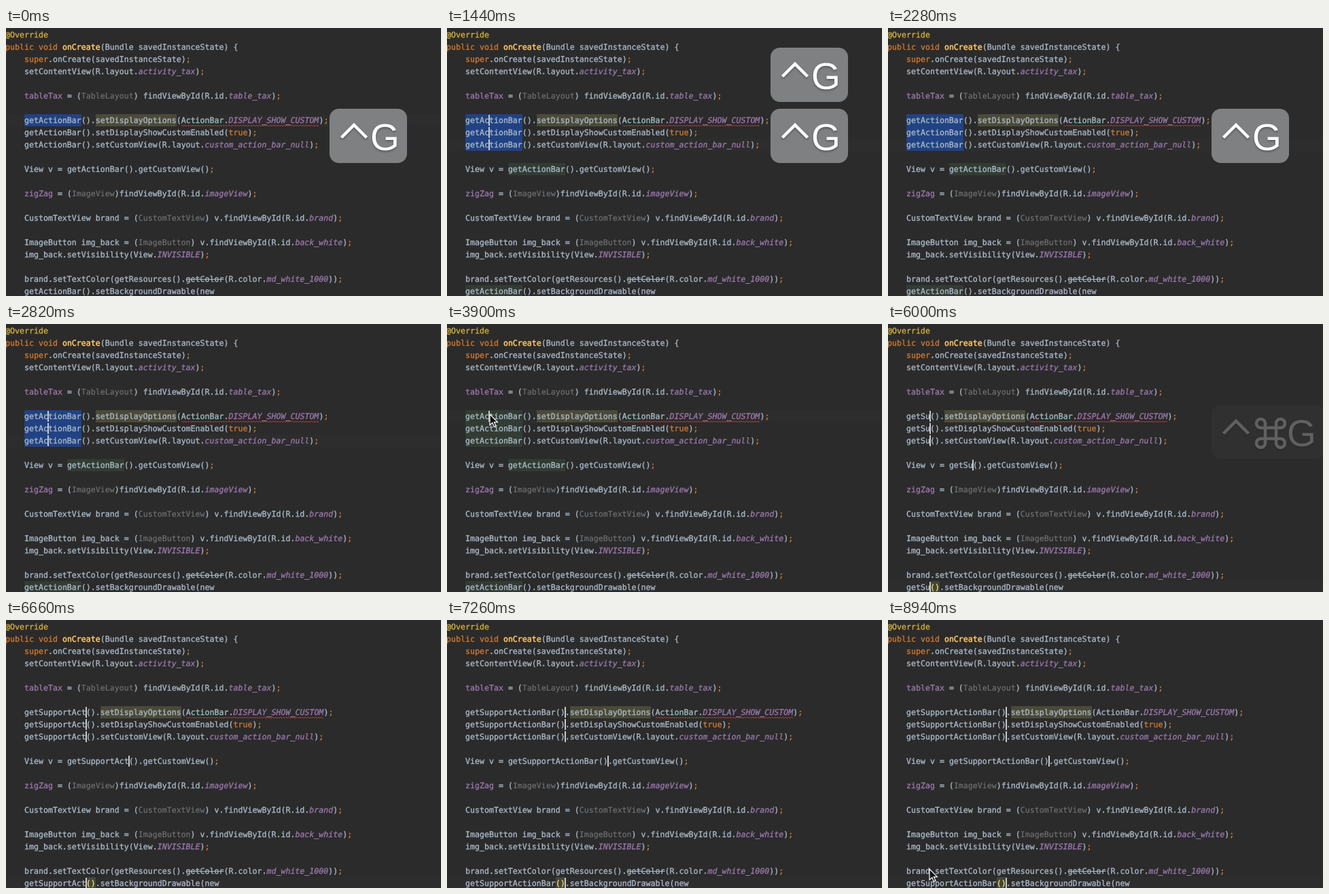
An HTML page that plays this animation: 640 by 395 pixels, repeating every 9 s.

```html
<!DOCTYPE html>
<html lang="en">
<head>
<meta charset="utf-8">
<title>Multiple carets</title>
<style>
html, body { margin: 0; width: 100%; height: 100%; overflow: hidden; background: #2b2b2b; }
#stage { position: relative; width: 640px; height: 395px; overflow: hidden; background: #2b2b2b; }
.line {
  position: absolute; left: -1px; height: 18px; white-space: pre; color: #a9b7c6;
  font: 11.627px/18px "DejaVu Sans Mono", monospace;
  text-rendering: geometricPrecision; font-variant-ligatures: none;
  -webkit-text-stroke: .35px;
}
#row { position: absolute; left: 0; width: 640px; height: 18px; background: #2d2d2d; }
.line b, .w, .m { display: inline-block; position: relative; height: 18px; vertical-align: top; font-weight: 400; }
b.use { background: #323c33; }
b.sel { background: #214283; }
.caret { position: absolute; top: 1px; width: 2px; height: 16px; margin-left: -1px; background: #c8c8c8; z-index: 1; }
.a { color: #cfae3c; }
.o { color: #cc7832; }
.y { color: #ffc66d; -webkit-text-stroke-width: .5px; }
.p, .f { color: #9876aa; }
.f { font-style: italic; }
.g { color: #747678; -webkit-text-stroke-width: .1px; }
.s { text-decoration: line-through; }
.w { background: #4b4a38; }
.match .m { background: #43463c; color: #ffd75e; }
.e { position: relative; }
.bad .e::after {
  content: ""; position: absolute; left: 0; right: 0; bottom: -2px; height: 2px;
  background:
    linear-gradient(90deg, #a8403c 50%, transparent 0) 0 0 / 4px 1px repeat-x,
    linear-gradient(90deg, #a8403c 50%, transparent 0) 2px 1px / 4px 1px repeat-x;
}
svg { position: absolute; left: 0; top: 0; }
.bezel rect { fill: #7e8082; }
.bezel path { fill: none; stroke: #fff; stroke-width: 4.5; }
.bezel text { fill: #fff; font: 55px "Liberation Sans", Arial, sans-serif; }
.bezel g { filter: drop-shadow(0 2px 1.5px rgba(0, 0, 0, .3)); }
</style>
</head>
<body>
<div id="stage">
  <div id="row"></div>
  <svg id="overlay" width="640" height="395">
    <g id="pointer">
      <path d="M0 0V16L3.8 12.6L6.4 18.4L9 17.2L6.4 11.6H11.4Z" fill="#111" stroke="#fff" stroke-width="1.2"/>
    </g>
  </svg>
</div>
<script>
// ~x{text} styles text with class x (one class per letter); $ is the edited name.
const CODE = `~a{@Override}
~o{public void} ~y{onCreate}(Bundle savedInstanceState) {
    ~o{super}.onCreate(savedInstanceState);
    setContentView(R.layout.~f{activity_tax});

    ~p{tableTax} = (~g{TableLayout}) findViewById(R.id.~f{table_tax});

    $~m{()}.~w{setDisplayOptions}(~e{ActionBar.}~ef{DISPLAY_SHOW_CUSTOM});
    $~m{()}.setDisplayShowCustomEnabled(~o{true});
    $~m{()}.setCustomView(R.layout.~f{custom_action_bar_null});

    View v = $~m{()}.getCustomView();

    ~p{zigZag} = (~g{ImageView})findViewById(R.id.~f{imageView});

    CustomTextView brand = (~g{CustomTextView}) v.findViewById(R.id.~f{brand});

    ImageButton img_back = (~g{ImageButton}) v.findViewById(R.id.~f{back_white});
    img_back.setVisibility(View.~f{INVISIBLE});

    brand.setTextColor(getResources().~s{getColor}(R.color.~f{md_white_1000}));
    $~m{()}.setBackgroundDrawable(new`;

const LOOP = 9000, STEP = 60;
const USAGES = 300, CLICK = 3400, SELECT_ALL = 4600, TYPE = 5680, KEY = 80, TYPED = 7200, FIXED = 8100;
const PRESSES = [-60, 540, 1080, SELECT_ALL];
const LINGER = 1250, FADE = 200;
const OLD_NAME = "getActionBar", NEW_NAME = "getSupportActionBar";

const $ = id => document.getElementById(id);
const stage = $("stage"), overlay = $("overlay"), pointer = $("pointer"), row = $("row");
const lineTop = i => 18 * i + 1;
const clamp = (v, lo, hi) => Math.max(lo, Math.min(hi, v));

const names = [];
CODE.split("\n").forEach((code, i) => {
  const line = document.createElement("div");
  line.className = "line";
  line.style.top = lineTop(i) + "px";
  line.innerHTML = code
    .replace(/;/g, "~o{;}")
    .replace(/~([a-z]+)\{(.*?)\}/g, (_, c, text) => `<span class="${[...c].join(" ")}">${text}</span>`)
    .replace("$", () => '<b><span class="name"></span><span class="caret"></span></b>');
  stage.insertBefore(line, overlay);
  const box = line.querySelector("b");
  if (box) names.push({ i, line, box, text: box.firstChild, caret: box.lastChild });
});
const first = names[0], last = names[names.length - 1];

const CTRL = '<path d="M17.5 42.5L36 24L54.5 42.5"/>';
const CMD = '<path transform="translate(87 42)" d="M-8-14.5A6.5 6.5 0 1 0-14.5-8H14.5A6.5 6.5 0 1 0 8-14.5V14.5' +
  'A6.5 6.5 0 1 0 14.5 8H-14.5A6.5 6.5 0 1 0-8 14.5Z"/>';
const bezels = PRESSES.map(at => {
  const all = at === SELECT_ALL;
  const el = document.createElementNS("http://www.w3.org/2000/svg", "g");
  el.setAttribute("class", "bezel");
  el.innerHTML = `<rect width="${all ? 166 : 114}" height="80" rx="14"/>
    <g>${CTRL}${all ? CMD : ""}<text x="${all ? 111 : 60}" y="61">G</text></g>`;
  overlay.insertBefore(el, pointer);
  return el;
});

// The panel fades faster than its glyphs: its opacity applies on top of the group's.
function drawBezels(t) {
  bezels.forEach((el, k) => {
    const age = t - PRESSES[k];
    const newer = PRESSES.filter((at, j) => j > k && at <= t).length;
    const opacity = age < 0 ? 0 : clamp(1 - (age - LINGER) / FADE, 0, 1);
    el.setAttribute("transform", `translate(476 ${119 - 90 * newer})`);
    el.setAttribute("opacity", opacity);
    el.firstChild.setAttribute("opacity", opacity);
  });
}

function drawPointer(t) {
  const resting = t >= 3300 && t < SELECT_ALL, moving = t >= 8460;
  const k = clamp((t - 8460) / 420, 0, 1), ease = k * k * (3 - 2 * k);
  pointer.style.display = resting || moving ? "" : "none";
  pointer.setAttribute("transform", `translate(${63 - 2 * ease} ${133 + 234 * ease})`);
}

function drawEditor(t) {
  const typing = t >= TYPE, allCarets = t >= SELECT_ALL;
  const picked = allCarets ? names.length : t >= CLICK ? 1 : PRESSES.filter(at => at <= t).length;
  const selecting = !typing && (allCarets || t < CLICK);
  const count = clamp(Math.floor((t - TYPE) / KEY) + 1, 0, NEW_NAME.length);
  const column = !typing ? 5 : t >= TYPED ? NEW_NAME.length + 2 : count;
  const blink = (t + LOOP - (typing ? 6850 : 420)) % 1000 < 500;
  const caretOn = blink || (typing && t < TYPED);

  names.forEach((n, k) => {
    const active = k < picked;
    n.text.textContent = typing ? NEW_NAME.slice(0, count) : OLD_NAME;
    n.box.className = selecting && active ? "sel" : t >= USAGES && !allCarets ? "use" : "";
    n.caret.style.left = column + "ch";
    n.caret.style.display = active && caretOn ? "" : "none";
  });
  row.style.top = lineTop(names[picked - 1].i) + "px";
  first.line.classList.toggle("bad", t < FIXED);
  last.line.classList.toggle("match", typing);
}

const start = performance.now();
function frame() {
  const t = Math.floor(((performance.now() - start) % LOOP) / STEP) * STEP;
  drawEditor(t);
  drawBezels(t);
  drawPointer(t);
  requestAnimationFrame(frame);
}
frame();
</script>
</body>
</html>
```
